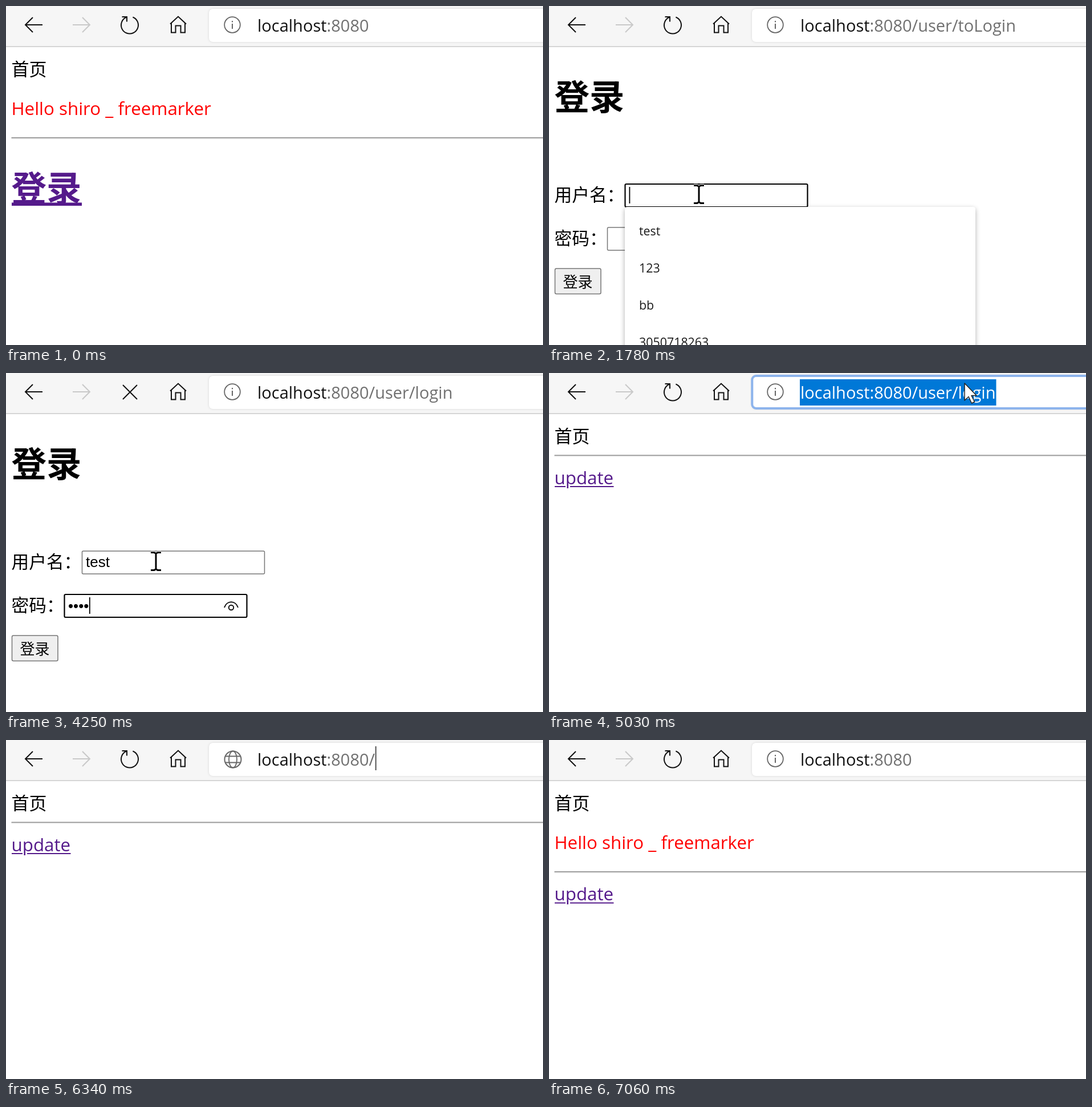
Write an HTML page with a canvas that moves like this. It is 942 px wide and 594 px high and loops after 8.29 s.

```html
<!DOCTYPE html>
<html lang="zh">
<head>
<meta charset="utf-8">
<title>Login demo</title>
<style>
html, body { margin: 0; width: 100%; height: 100%; overflow: hidden; background: #fff; }
canvas { display: block; }
</style>
</head>
<body>
<canvas id="stage" width="942" height="594"></canvas>
<script>
const LOOP = 8290;
const g = document.getElementById('stage').getContext('2d');
const SANS = '"Open Sans", "Noto Sans CJK SC", sans-serif';
const CJK = '"Noto Sans CJK SC", "Noto Sans CJK", sans-serif';
const ARIAL = '"Liberation Sans", Arial, sans-serif';
const URL_FONT = '29px ' + SANS;
const HOST = 'localhost', URL_X = 441;
const VISITED = '#551a8b', BLUE = '#0078d7';
const USER = 'test';

// start, end, poses, from x, from y, to x, to y
const moves = [
  [70, 610, 8, 711, 499, 99, 293],
  [683, 850, 3, 99, 293, 97, 315],
  [1240, 1550, 5, 97, 315, 263, 330],
  [4579, 4580, 2, 263, 330, 619, 141],
  [4643, 4950, 5, 619, 141, 729, 18],
  [5100, 5410, 5, 729, 18, 915, 35],
  [5493, 5870, 6, 915, 35, 656, 48]
];
const presses = [[1130, 1240], [1620, 1700], [4950, 5030], [5410, 5870]];

const within = (t, a, b) => t >= a && t < b;
const count = (t, times) => times.filter(s => t >= s).length;

function text(s, x, y, font, color = '#000') {
  g.font = font;
  g.fillStyle = color;
  g.fillText(s, x, y);
}
function width(s, font) {
  g.font = font;
  return g.measureText(s).width;
}
function rect(x, y, w, h, color) {
  g.fillStyle = color;
  g.fillRect(x, y, w, h);
}
function stroke(path, color = '#111', w = 2) {
  g.strokeStyle = color;
  g.lineWidth = w;
  g.stroke(new Path2D(path));
}
function ring(x, y, rx, ry, color, w) {
  g.strokeStyle = color;
  g.lineWidth = w;
  g.beginPath();
  g.ellipse(x, y, rx, ry, 0, 0, Math.PI * 2);
  g.stroke();
}
function box(x, y, w, h, r, fill, line, lw) {
  g.beginPath();
  g.roundRect(x, y, w, h, r);
  g.fillStyle = fill;
  g.fill();
  if (line) {
    g.strokeStyle = line;
    g.lineWidth = lw;
    g.stroke();
  }
}
function panel(x, y, w, h, blur) {
  g.save();
  g.shadowColor = 'rgba(0,0,0,.32)';
  g.shadowBlur = blur;
  g.shadowOffsetY = 3;
  box(x, y, w, h, 4, '#fff');
  g.restore();
}

function pointer(t) {
  let x = 0, y = 0;
  for (const [a, b, n, x0, y0, x1, y1] of moves) {
    if (t < a) break;
    const p = Math.min(1, Math.floor((t - a) / (b - a) * (n - 1) + 0.01) / (n - 1));
    const e = p * (1.6 - 0.6 * p);
    x = x0 + (x1 - x0) * e;
    y = y0 + (y1 - y0) * e;
  }
  return { x, y };
}

function pathOf(t) {
  if (t < 1310) return ':8080';
  if (t < 4250) return ':8080/user/toLogin';
  if (t < 6340) return ':8080/user/login';
  return t < 6900 ? ':8080/' : ':8080';
}

function toolbarIcons(t) {
  stroke('M64 33H34M47 20L34 33L47 46');
  stroke('M117 33H147M134 20L147 33L134 46', '#c9c9c9');
  const loading = within(t, 1240, 1470) || within(t, 3870, 4400) || within(t, 6820, 7060);
  if (loading) {
    stroke('M205 21L230 46M230 21L205 46');
  } else {
    g.beginPath();
    g.arc(217, 33.5, 15, -1.2, 4.35);
    g.strokeStyle = '#111';
    g.lineWidth = 2;
    g.stroke();
    stroke('M203.5 19H212V27.5');
  }
  stroke('M288 31.5L302 18.5L316 31.5M290 30V46.5H297.5V34.5H306.5V46.5H314V30');
}

function siteIcon(t) {
  const c = '#666';
  if (within(t, 6340, 6900)) {
    ring(398, 34, 14.5, 14.5, c, 2);
    ring(398, 34, 7, 14.5, c, 1.8);
    stroke('M385 28.5H411M385 39.5H411', c, 1.8);
  } else {
    ring(397, 33, 13.8, 13.8, c, 1.8);
    rect(396, 26, 2, 2.4, c);
    rect(396, 31, 2, 9, c);
  }
}

function addressBar(t, ptr) {
  rect(0, 0, 942, 71, '#f6f6f6');
  rect(0, 70.4, 942, 1.6, '#cdcdcd');
  toolbarIcons(t);
  const focused = within(t, 4950, 6340);
  g.save();
  g.shadowColor = 'rgba(0,0,0,.13)';
  g.shadowBlur = 4;
  box(356, 5, 620, 58, 7, '#fff');
  g.restore();
  if (focused) box(356.3, 5, 620, 57, 7, '#fff', '#8db4ec', 4);
  siteIcon(t);

  const path = pathOf(t), full = HOST + path;
  const x = n => URL_X + width(full.slice(0, n), URL_FONT);
  text(HOST, URL_X, 45, URL_FONT, '#111');
  text(path, x(HOST.length), 45, URL_FONT, '#707070');

  let from = full.length;
  if (within(t, 4950, 5410)) from = 0;
  if (within(t, 5570, 6340)) {
    while (from > 15 && (x(from) + x(from - 1)) / 2 > ptr.x) from--;
  }
  const caretOn = within(t, 5410, 6340) && from === full.length || within(t, 6340, 6820);
  if (caretOn) rect(x(full.length) + 0.5, 11, 2, 42, '#555');
  if (focused && from < full.length) {
    const left = x(from) - 1, right = x(full.length) + 1;
    rect(left, 11, right - left, 46, BLUE);
    text(full.slice(from), x(from), 45, URL_FONT, '#fff');
  }
}

function rule(y) {
  rect(9.5, y, 940, 1.8, '#8f8f8f');
  rect(9.5, y + 1.8, 940, 1.4, '#ececec');
}

function homePage(greeting, member) {
  text('首页', 9.5, 121.5, '31px ' + CJK);
  if (greeting) text('Hello shiro _ freemarker', 9.5, 191, '31.3px ' + SANS, '#f00');
  const y = greeting ? 230 : 143.5;
  rule(y);
  if (member) {
    text('update', 9.5, y + 51, '31.3px ' + SANS, VISITED);
    rect(10, y + 54.5, 19, 2, VISITED);
    rect(37, y + 54.5, 76.5, 2, VISITED);
  } else {
    text('登录', 9.5, 341.5, 'bold 61.4px ' + CJK, VISITED);
    rect(10, 344.5, 123, 5.5, VISITED);
  }
}

function field(x, y, active) {
  box(x, y, 320, 40, 2, '#fff', active ? '#000' : '#767676', active ? 2.2 : 1.5);
}

function suggestions(filtered) {
  panel(133, 352, 615, filtered ? 84 : 260, 9);
  const items = filtered ? [USER] : [USER, '123', 'bb', '3050718263'];
  items.forEach((s, i) => text(s, 158, 402 + i * 65, '21.4px ' + SANS, '#1b1b1b'));
}

function eye() {
  stroke('M383 411C387 398 403 398 407 411', '#111', 2);
  ring(395, 411, 4.2, 4.2, '#111', 2);
}

function loginPage(t) {
  const font = '30.7px ' + CJK, input = '26px ' + ARIAL;
  text('登录', 9.5, 181.5, 'bold 61.4px ' + CJK);
  text('用户名：', 9.5, 341.5, font);
  text('密码：', 9.5, 417.5, font);
  const onUser = within(t, 1620, 2920), onPass = t >= 2920;
  field(133.5, 312, onUser);
  field(102.5, 388, onPass);
  box(10.5, 460, 80.5, 44.5, 2.5, '#efefef', '#767676', 1.5);
  text('登录', 24.5, 493, '26px ' + CJK);

  const name = USER.slice(0, count(t, [2090, 2390, 2480, 2620]));
  text(name, 140, 340, input);
  if (onUser) rect(140.5 + width(name, input), 317, 1.8, 29, '#000');
  const dots = '•'.repeat(count(t, [3250, 3480, 3620, 3720]));
  text(dots, 109, 417, input);
  if (onPass) rect(109.5 + width(dots, input), 393, 1.8, 29, '#000');
  if (dots) eye();
  if (within(t, 1780, 2700)) suggestions(t >= 2180);
}

function urlList() {
  panel(356, 72, 620, 361, 13);
  rect(356, 72, 620, 67, '#ededed');
  ['', '/user/toLogin', '/index', '/user/update', '/user/login'].forEach((p, i) => {
    const y = 105 + i * 69.5;
    ring(397, y, 13, 13, '#666', 1.8);
    stroke(`M385 ${y - 5}H409M385 ${y + 5}H409`, '#666', 1.6);
    const title = i % 2 ? '登录 - ' : '首页 - ';
    text(title, URL_X, y + 10, '28px ' + SANS, '#222');
    text(HOST + ':8080' + p, URL_X + width(title, '28px ' + SANS), y + 10, '28px ' + SANS, '#2463b4');
  });
}

const shapes = {
  arrow: new Path2D('M0 0V30L7 23.5L12.5 35L17.5 32.5L12 21.5H21Z'),
  hand: new Path2D('M-2 2C-2 -1 3 -1 3 2V14C4 11 8 12 8 15C10 13 13 14 13 17C15 15 18 17 18 20V31C18 39 13 43 6 43C0 43 -3 39 -6 34L-12 25C-14 21 -9 19 -6 23L-2 27Z'),
  beam: new Path2D('M-9 -15.5H-3L0 -13.5L3 -15.5H9M0 -13.5V13.5M-9 15.5H-3L0 13.5L3 15.5H9')
};

function cursorKind(t, { x, y }) {
  if (t < 1310) return x < 133 && y > 285 && y < 352 ? 'hand' : 'arrow';
  if (t < 4580) return x > 133 && y > 311 ? 'beam' : 'arrow';
  return t >= 5100 ? 'beam' : 'arrow';
}

function cursor(t, ptr) {
  if (!within(t, 70, 6340)) return;
  const kind = cursorKind(t, ptr), shape = shapes[kind];
  g.save();
  g.translate(ptr.x, ptr.y);
  g.lineJoin = 'round';
  if (kind === 'beam') {
    g.strokeStyle = '#fff';
    g.lineWidth = 5;
    g.stroke(shape);
    g.strokeStyle = '#000';
    g.lineWidth = 3;
    g.stroke(shape);
  } else {
    g.fillStyle = '#fff';
    g.fill(shape);
    g.strokeStyle = '#222';
    g.lineWidth = 1.5;
    g.stroke(shape);
  }
  g.restore();
  if (presses.some(([a, b]) => within(t, a, b))) {
    g.fillStyle = 'rgba(255,232,0,.55)';
    g.beginPath();
    g.arc(ptr.x, ptr.y, 23.5, 0, Math.PI * 2);
    g.fill();
  }
}

function draw(t) {
  rect(0, 0, 942, 594, '#fff');
  const ptr = pointer(t);
  if (t < 1310) homePage(true, false);
  else if (t < 4330) loginPage(t);
  else homePage(t >= 6900, true);
  addressBar(t, ptr);
  if (within(t, 6430, 6900)) urlList();
  cursor(t, ptr);
}

const begin = performance.now();
function tick() {
  draw((performance.now() - begin) % LOOP);
  requestAnimationFrame(tick);
}
tick();
</script>
</body>
</html>
```
